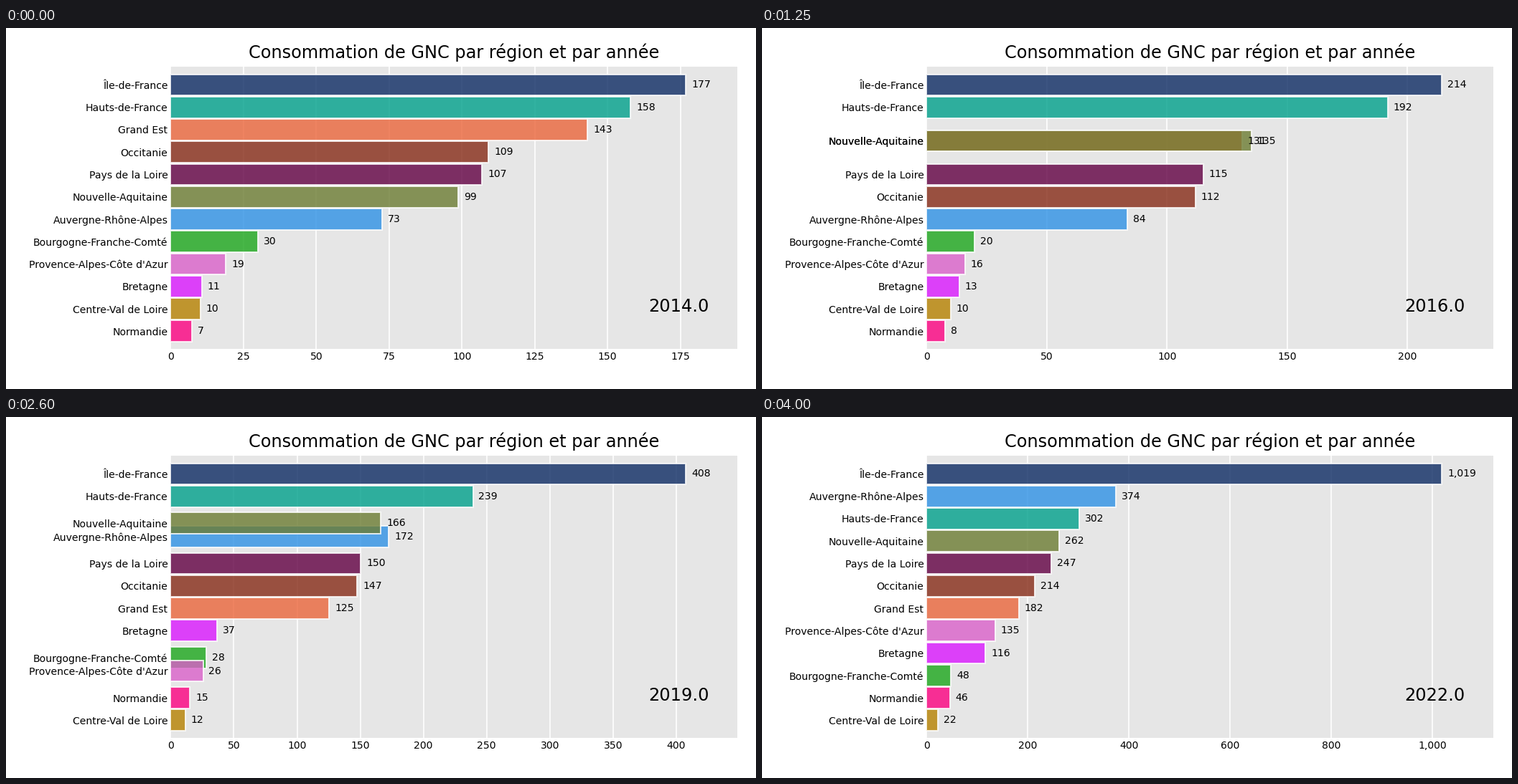
Write a matplotlib script that moves like this. It is 1045 px wide and 504 px high and loops after 4050 ms.

```python
import numpy as np
import matplotlib.pyplot as plt
from matplotlib.animation import FuncAnimation
from matplotlib.ticker import StrMethodFormatter

W, H, DPI = 1045, 504, 144
STEPS = 10          # animation steps per year
FIRST_YEAR = 2014

# region: colour, then key values for 2014, 2016, 2018, 2020 and 2022
REGIONS = {
    "Auvergne-Rhône-Alpes": ("#2E91E5", 72.6, 76.9, 125, 202, 374),
    "Bourgogne-Franche-Comté": ("#1CA71C", 30, 19.8, 21.4, 32, 48),
    "Bretagne": ("#DA16FF", 10.7, 12.1, 22, 46, 116),
    "Centre-Val de Loire": ("#B68100", 10.2, 10, 9.9, 12.5, 22),
    "Grand Est": ("#EB663B", 143.1, 131, 132.2, 121, 182),
    "Hauts-de-France": ("#00A08B", 157.9, 185.8, 229.8, 245, 302),
    "Normandie": ("#FC0080", 7.3, 7, 12.6, 17, 46),
    "Nouvelle-Aquitaine": ("#6C7C32", 98.8, 130.9, 162, 169, 262),
    "Occitanie": ("#862A16", 109.1, 108.8, 130.5, 158, 214),
    "Pays de la Loire": ("#620042", 106.9, 112.2, 133.5, 161, 247),
    "Provence-Alpes-Côte d'Azur": ("#DA60CA", 18.9, 16.4, 13, 33.5, 135),
    "Île-de-France": ("#0D2A63", 176.9, 199.7, 306.8, 470.5, 1019),
}

# share of each two-year change reached in its middle year
MIDWAY = .4, .275, .52, .52


def yearly(keys):
    """Fill in the years between the key values."""
    mids = [a + (b - a) * m for a, b, m in zip(keys, keys[1:], MIDWAY)]
    series = np.empty(len(keys) + len(mids))
    series[::2], series[1::2] = keys, mids
    return series


names = list(REGIONS)
colors = [color for color, *_ in REGIONS.values()]
values = np.array([yearly(keys) for _, *keys in REGIONS.values()])
n_bars, n_years = values.shape
n_frames = (n_years - 1) * STEPS + 1

# the largest value gets the top position, n_bars
ranks = values.argsort(axis=0).argsort(axis=0) + 1


def blend(table, i):
    """Linear interpolation between yearly columns at step i."""
    year, step = divmod(i, STEPS)
    after = min(year + 1, n_years - 1)
    return table[:, year] + (table[:, after] - table[:, year]) * step / STEPS


plt.rcParams["font.family"] = "DejaVu Sans"
fig = plt.figure(figsize=(W / DPI, H / DPI), dpi=DPI, facecolor="white")

left, right, top, bottom = 229.45, 1019, 54.41, 448.36
ax = fig.add_axes([left / W, 1 - bottom / H, (right - left) / W, (bottom - top) / H])
ax.set_facecolor(".9")
ax.set_title("Consommation de GNC par région et par année", fontsize=12)
ax.grid(True, axis="x", color="white")
ax.set_axisbelow(True)
ax.tick_params(length=0, labelsize=7, pad=2)
ax.xaxis.set_major_formatter(StrMethodFormatter("{x:,.0f}"))
for spine in ax.spines.values():
    spine.set_visible(False)

bars = ax.barh(ranks[:, 0], values[:, 0], height=.95, color=colors, alpha=.8, ec="white")
ax.set_ylim(.2, n_bars + .8)

labels = [ax.text(0, 0, "", fontsize=7, ha="left", va="center",
                  transform=ax.transAxes) for _ in names]
year_label = ax.text(.95, .15, "", fontsize=12, ha="right", va="center",
                     transform=ax.transAxes)


def update(i):
    lengths, places = blend(values, i), blend(ranks, i)
    ax.set_xlim(0, lengths.max() * 1.1)
    ax.set_yticks(places, labels=names)
    for bar, label, x, y in zip(bars, labels, lengths, places):
        bar.set_width(x)
        bar.set_y(y - bar.get_height() / 2)
        tx, ty = ax.transLimits.transform((x, y))
        label.set_position((tx + .01, ty))
        label.set_text(f"{x:,.0f}")
    year_label.set_text(f"{FIRST_YEAR + i // STEPS:.1f}")
    return [*bars, *labels, year_label]


anim = FuncAnimation(fig, update, frames=n_frames, init_func=lambda: update(0),
                     interval=50, repeat=True, repeat_delay=0, blit=False)
plt.show()
```
